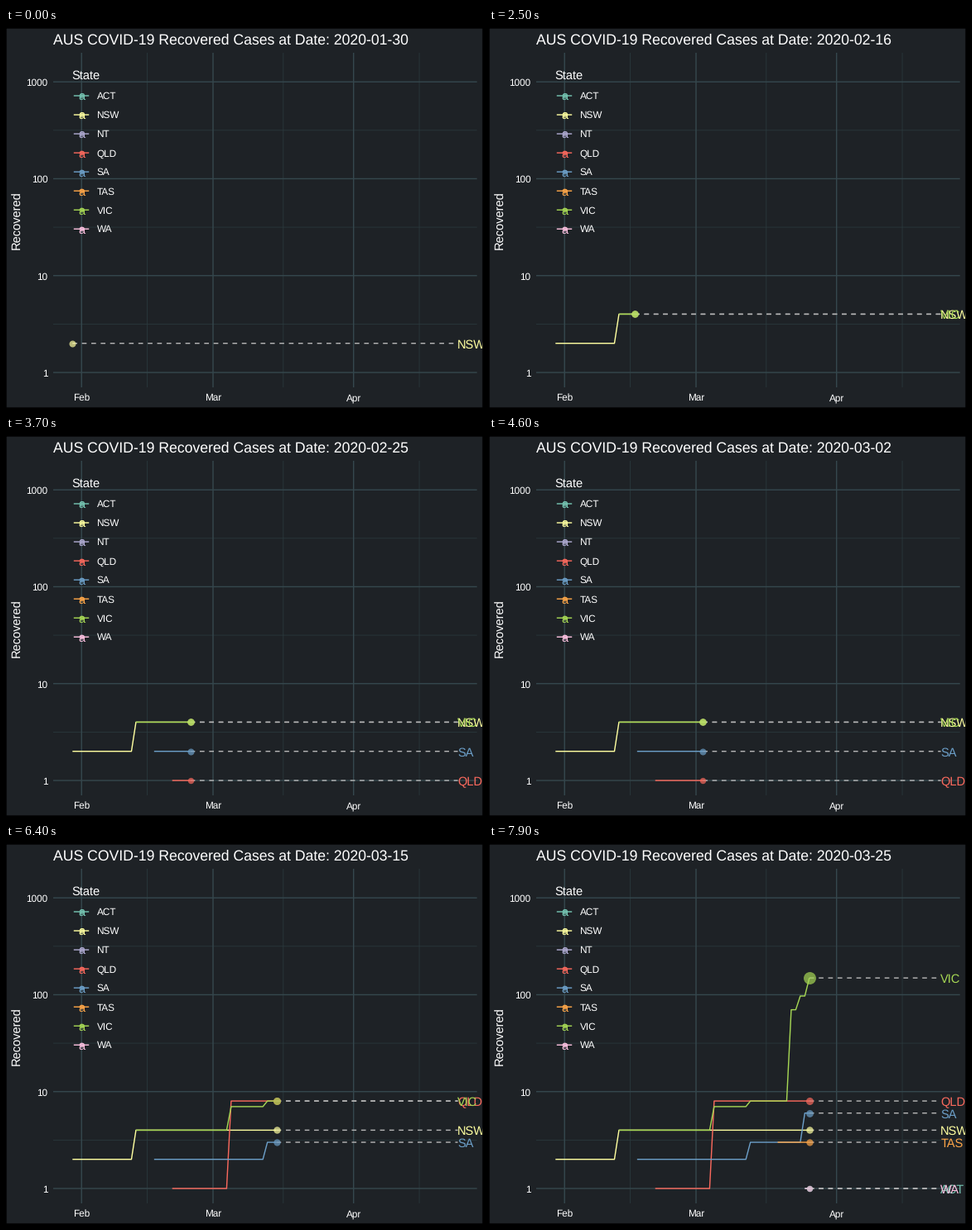
Animation of 576x460 px, one loop 8000 ms. Source, as a matplotlib script:

```python
import numpy as np
import matplotlib.pyplot as plt
from matplotlib.animation import FuncAnimation

W, H, DPI = 576, 460, 64
PX = 72 / DPI                      # points per pixel
FRAMES, INTERVAL = 80, 100
DAY0 = np.datetime64("2020-01-30")

BG, MAJOR, MINOR = "#1e2226", "#35474d", "#2c3c40"
DASH = "#b6b6b6"
LEFT, RIGHT, TOP, BOTTOM = 57, 568.7, 30, 435
END_X = 545.6
LINE = 1.42
BASE, SMALL, LARGE = 14.67, 11.73, 17.6

COLORS = {
    "ACT": "#76c6b3", "NSW": "#ffffa0", "NT": "#b0abd2", "QLD": "#fa695d",
    "SA": "#6c9fc8", "TAS": "#fca548", "VIC": "#a6d754", "WA": "#fbc0df",
}
# (day, value) each time a count changes
STEPS = {
    "ACT": [(55, 1)],
    "NSW": [(0, 2), (14, 4)],
    "QLD": [(22, 1), (35, 8)],
    "SA": [(18, 2), (43, 3), (55, 6)],
    "TAS": [(49, 3)],
    "VIC": [(14, 4), (35, 7), (43, 8), (52, 70), (54, 97), (56, 149)],
    "WA": [(55, 1)],
}
LAST_DAY = 56

plt.rcParams["font.family"] = "Liberation Sans"
plt.rcParams["text.hinting"] = "none"


def day_x(day):
    return 80.3 + 5.474 * day


def val_y(value):
    return 417 - 117.27 * np.log10(value)


def radius(value):
    return 3.7 + 0.31 * np.sqrt(value - 1)


def expand(steps):
    """Daily path of one state: frame of each day, x, y and point radius."""
    days = np.arange(steps[0][0], LAST_DAY + 1)
    starts, values = zip(*steps)
    daily = np.array(values)[np.searchsorted(starts, days, side="right") - 1]
    ticks = np.array([round(d * 17 / 12) for d in days])
    return ticks, day_x(days), val_y(daily), radius(daily)


SERIES = {name: expand(steps) for name, steps in STEPS.items()}

fig = plt.figure(figsize=(W / DPI, H / DPI), dpi=DPI, facecolor=BG)
ax = fig.add_axes([0, 0, 1, 1])
ax.set_xlim(0, W)
ax.set_ylim(H, 0)
ax.axis("off")


def text(x, y, s, size, color="white", **kw):
    """Text whose capitals are centred on y."""
    return ax.text(x, y + 0.358 * size, s, fontsize=size * PX, color=color,
                   va="baseline", **kw)


def line(xs, ys, color, width=LINE, **kw):
    return ax.plot(xs, ys, color=color, lw=width * PX, snap=False,
                   solid_capstyle="butt", dash_capstyle="butt",
                   solid_joinstyle="round", **kw)[0]


def dot(x, y, r, color, zorder):
    return ax.scatter([x], [y], s=(2 * r * PX) ** 2, color=color, alpha=0.7,
                      linewidths=0, zorder=zorder)


def draw_grid():
    months = {"Feb": 2, "Mar": 31, "Apr": 62}
    for day in (16.5, 46.5, 76.5):
        line([day_x(day)] * 2, [TOP, BOTTOM], MINOR, LINE / 2, zorder=1)
    for power in (0.5, 1.5, 2.5):
        line([LEFT, RIGHT], [val_y(10 ** power)] * 2, MINOR, LINE / 2, zorder=1)
    for name, day in months.items():
        line([day_x(day)] * 2, [TOP, BOTTOM], MAJOR, zorder=2)
        text(day_x(day), 447, name, SMALL, ha="center")
    for value in (1, 10, 100, 1000):
        line([LEFT, RIGHT], [val_y(value)] * 2, MAJOR, zorder=2)
        text(50.5, val_y(value) + 0.7, str(value), SMALL, ha="right")
    ax.text(18, 232.5, "Recovered", fontsize=BASE * PX, color="white",
            rotation=90, ha="center", va="baseline", rotation_mode="anchor")
    line([0, W, W, 0, 0], [0, 0, H, H, 0], "black", zorder=9)


def draw_legend():
    text(79.5, 57, "State", BASE, zorder=8)
    for i, (name, color) in enumerate(COLORS.items()):
        y = 82 + 23.04 * i
        line([81.8, 100.2], [y, y], color, zorder=7)
        dot(91, y, 3, color, 7.5)
        text(91, y, "a", BASE, color, ha="center", zorder=8)
        text(109.5, y, name, SMALL, zorder=8)


draw_grid()
draw_legend()
title = text(57, 14, "", LARGE)
moving = []


def update(frame):
    while moving:
        moving.pop().remove()
    date = DAY0 + np.timedelta64(frame * 12 // 17, "D")
    title.set_text(f"AUS COVID-19 Recovered Cases at Date: {date}")
    for name, (ticks, xs, ys, rs) in SERIES.items():
        if frame < ticks[0]:
            continue
        color = COLORS[name]
        x, y, r = (np.interp(frame, ticks, v) for v in (xs, ys, rs))
        past = ticks <= frame
        moving.extend([
            line(np.append(xs[past], x), np.append(ys[past], y), color, zorder=3),
            line([x, END_X], [y, y], DASH, ls=(0, (4, 4)), zorder=4),
            dot(x, y, r, color, 5),
            text(END_X - 0.4, y + 0.5, name, BASE, color, zorder=6),
        ])
    return [title, *moving]


anim = FuncAnimation(fig, update, frames=FRAMES, interval=INTERVAL,
                     init_func=lambda: update(0), repeat=True,
                     repeat_delay=0, blit=False)
plt.show()
```
